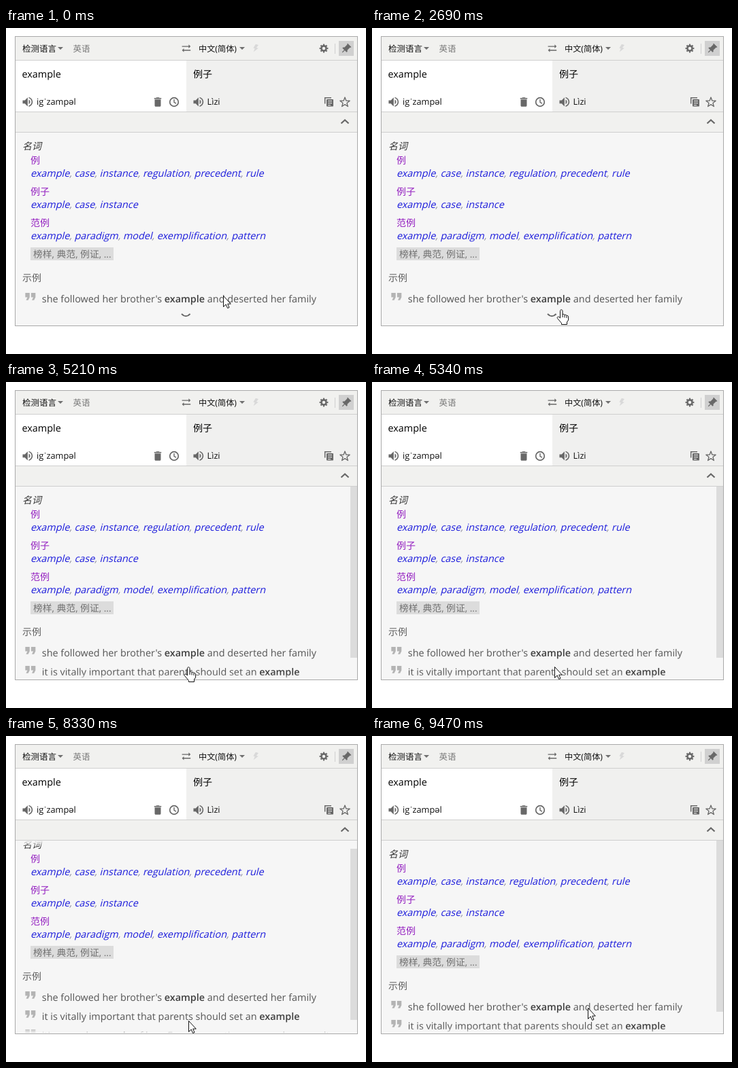
Write an HTML page that moves like this. It is 529 by 480 pixels and loops after 9.54 s.

```html
<!DOCTYPE html>
<html lang="zh-CN">
<head>
<meta charset="utf-8">
<title>Translation popup</title>
<style>
  html, body { margin: 0; width: 100%; height: 100%; overflow: hidden; background: #fff; }
  svg { display: block; }
  text { font: 14.4px "Open Sans", "Noto Sans CJK SC", "Noto Sans CJK", sans-serif; white-space: pre; text-rendering: geometricPrecision; }
  .head { font-size: 12.5px; }
  .sound { font-size: 12.8px; }
  .cjk { font-size: 14px; }
  .sense { fill: #9420c0; }
  .word { fill: #1c1cdc; }
  .comma { fill: #8c8c9c; }
  .sample { fill: #555; }
  .sample tspan { font-weight: 600; fill: #404040; }
  .icon { fill: #686868; }
  .line { fill: none; stroke: #686868; }
</style>
</head>
<body>
<svg width="529" height="480" viewBox="0 0 529 480">
  <defs>
    <clipPath id="view"><rect x="14" y="154" width="502" height="284"/></clipPath>
    <linearGradient id="fade" x2="0" y2="1">
      <stop stop-color="#f6f6f6"/>
      <stop offset="1" stop-color="#f6f6f6" stop-opacity="0"/>
    </linearGradient>
    <path id="speaker" d="M3 9v6h4l5 5V4L7 9H3zm13.5 3c0-1.77-1.02-3.29-2.5-4.03v8.05c1.48-.73 2.5-2.25 2.5-4.02zM14 3.23v2.06c2.89.86 5 3.54 5 6.71s-2.11 5.85-5 6.71v2.06c4.01-.91 7-4.49 7-8.77s-2.99-7.86-7-8.77z"/>
    <path id="quote" d="M6 17h3l2-4V7H5v6h3zm8 0h3l2-4V7h-6v6h3z" fill="#b4b4b4"/>
    <path id="caret" d="M0 0h8l-4 4z" fill="#707070"/>
  </defs>

  <!-- Panel -->
  <rect x="13" y="12" width="504" height="427" fill="#f6f6f6"/>
  <rect x="14" y="13" width="502" height="34" fill="#f1f1ef"/>
  <rect x="14" y="48" width="251" height="75" fill="#fff"/>
  <rect x="265" y="48" width="251" height="75" fill="#f0f0ef"/>
  <rect x="14" y="124" width="502" height="29" fill="#f1f1ef"/>
  <path d="M14 47.5h502M14 123.5h502M14 153.5h502" stroke="#cfcfcf"/>

  <!-- Toolbar -->
  <text class="head" x="24" y="35" fill="#111">检测语言</text>
  <use href="#caret" x="76" y="28"/>
  <text class="head" x="98.5" y="35" fill="#777">英语</text>
  <path class="icon" transform="translate(256.5 21.5) scale(.7)" d="M7 12l-4 4 4 4v-3h14v-2H7zM21 8l-4-4v3H3v2h14v3z"/>
  <text class="head" x="283" y="35" fill="#111" style="font-size:12.2px">中文(简体)</text>
  <use href="#caret" x="343" y="28"/>
  <path transform="translate(367 30) rotate(16) scale(.6) translate(-12 -12)" d="M9 2L6 13h4l-1 9 9-12h-5l3-8z" fill="#d9d9d9"/>
  <g class="line" transform="translate(467 30)">
    <circle r="3.6" stroke-width="2.6"/>
    <circle r="5.5" stroke-width="1.8" pathLength="16" stroke-dasharray="1 1" stroke-dashoffset=".5"/>
  </g>
  <path d="M483.5 23v15" stroke="#d0d0d0"/>
  <rect x="489" y="19" width="22" height="22" fill="#d0d0d0"/>
  <path class="icon" transform="translate(499.5 30.5) rotate(45) scale(.74) translate(-12 -12)" d="M16 12V4h1V2H7v2h1v8l-2 2v2h5.2v6h1.6v-6H18v-2l-2-2z"/>

  <!-- Input and result -->
  <text x="23.5" y="73" fill="#000">example</text>
  <text class="cjk" x="275" y="73.3" fill="#000">例子</text>
  <use href="#speaker" class="icon" transform="translate(22 99) scale(.82)"/>
  <text class="sound" x="45" y="113" fill="#111">igˈzampəl</text>
  <path class="icon" transform="translate(214 100) scale(.75)" d="M6 19c0 1.1.9 2 2 2h8c1.1 0 2-.9 2-2V7H6v12zM19 4h-3.5l-1-1h-5l-1 1H5v2h14V4z"/>
  <g class="line">
    <circle cx="247" cy="109" r="6.3" stroke-width="1.7"/>
    <path d="M247 105v4.3l3 1.8" stroke-width="1.4"/>
  </g>
  <use href="#speaker" class="icon" transform="translate(273 99) scale(.82)"/>
  <text class="sound" x="295.5" y="113" fill="#111">Lìzi</text>
  <path class="line" d="M468.7 111.5v-8.8h9.3" stroke-width="1.5"/>
  <rect class="icon" x="471" y="105" width="10" height="10.5" rx=".8"/>
  <path d="M473 107.5h6M473 110.5h6M473 113.5h4" stroke="#f0f0ef"/>
  <path id="star" class="line" stroke-width="1.3" stroke-linejoin="round"/>
  <path class="line" d="M492.5 140.500l5.5-5 5.5 5" stroke-width="2.2"/>

  <!-- Dictionary -->
  <g clip-path="url(#view)">
    <g id="content">
      <text class="cjk" fill="#333" transform="translate(24 179) skewX(-14)">名词</text>
      <rect x="36" y="323" width="122" height="19" fill="#dcdcdc"/>
      <text x="40" y="338" fill="#707070" style="font-size:13.8px">榜样, 典范, 例证, ...</text>
      <text class="cjk" x="24" y="373" fill="#606060">示例</text>
    </g>
    <rect x="14" y="154" width="492" height="9" fill="url(#fade)"/>
    <rect id="lowerFade" x="14" y="430" width="492" height="8" fill="url(#fade)" transform="rotate(180 260 434)"/>
    <rect id="thumb" x="506" width="10" height="252" fill="#dcdcdc"/>
    <path id="more" class="line" d="M258 421q6.3 6.6 12.6 0" stroke-width="1.9"/>
  </g>
  <rect x="13.5" y="12.5" width="503" height="426" fill="none" stroke="#a9a9a9"/>

  <g id="tooltip">
    <rect x="266.5" y="438.5" width="114" height="31" fill="#f8f8f8" stroke="#a9a9a9"/>
    <text x="277" y="458.3" fill="#111" style="font-size:12px">显示全部3个示例</text>
  </g>

  <!-- Pointers, with the hot spot at 0,0 -->
  <path id="arrow" d="M.5 .5V16.5L4.2 13L6.6 18.5L9 17.5L6.7 12.2H11.3Z" fill="#fff" stroke="#111"/>
  <g id="hand" fill="#fff" stroke="#111" stroke-linejoin="round">
    <path d="M-1.5 2.5C-1.5 .3 2 .3 2 2.5V8c.5-1 3-.8 3 .7c.8-1 3-.4 3 1c1-.8 2.6 0 2.6 1.4V16L8.5 19V22.5H.5V20.5L-5.5 13.5c-1.2-1.6 1-3.2 2.5-1.9L-1.5 13Z"/>
    <path d="M2 8v4M5 9v3.5M8 10v3" fill="none"/>
  </g>
</svg>

<script>
const LOOP = 9540;
const $ = id => document.getElementById(id);
const content = $('content');
const add = markup => content.insertAdjacentHTML('beforeend', markup);

const senses = [
  ['例', 'example case instance regulation precedent rule'],
  ['例子', 'example case instance'],
  ['范例', 'example paradigm model exemplification pattern']
];
senses.forEach(([sense, words], i) => {
  const y = 200 + 46 * i;
  const list = words.split(' ').map(w => `<tspan class="word">${w}</tspan>`).join('<tspan class="comma">, </tspan>');
  add(`<text class="cjk sense" x="36" y="${y}">${sense}</text>
    <text transform="translate(36 ${y + 19}) skewX(-14)">${list}</text>`);
});

const samples = [
  "she followed her brother's * and deserted her family",
  'it is vitally important that parents should set an *',
  "it's a good * of how European action can produce results"
];
samples.forEach((sample, i) => {
  const y = 404 + 28 * i;
  add(`<g class="${i ? 'extra' : ''}">
    <use href="#quote" transform="translate(23 ${y - 21.5}) scale(1.07)"/>
    <text class="sample" x="52.8" y="${y}">${sample.replace('*', '<tspan>example</tspan>')}</text></g>`);
});
const extras = [...document.querySelectorAll('.extra')];

const starPoints = Array.from({ length: 10 }, (_, i) => {
  const r = i % 2 ? 3.1 : 7.5, a = Math.PI * (i / 5 - 0.5);
  return `${498 + r * Math.cos(a)} ${109.5 + r * Math.sin(a)}`;
});
$('star').setAttribute('d', `M${starPoints.join('L')}Z`);

const show = (el, on) => el.setAttribute('visibility', on ? 'visible' : 'hidden');
const ease = u => u * u * (3 - 2 * u);

// Pointer moves arrive in discrete mouse samples.
function pointer(t) {
  const home = [319, 394], button = [268, 419];
  const between = (a, b, u) => a.map((v, i) => Math.round(v + (b[i] - v) * u));
  if (t < 2140) return home;
  if (t < 9130) {
    const u = Math.min(1, (t < 2190 ? 1 : 2 + Math.floor((t - 2190) / 69)) / 12);
    return between(home, button, (u + ease(u)) / 2);
  }
  const u = Math.min(1, (1 + Math.floor((t - 9130) / 68)) / 6);
  return between(button, [317, 400], ease(u));
}

function scrollAt(t) {
  if (t < 6790 || t >= 8400) return 0;
  return t < 8330 ? 36 : 14;
}

function draw(t) {
  const open = t >= 5210;
  const scroll = scrollAt(t);
  const [x, y] = pointer(t);
  const overButton = y >= 414 && t < 5340;

  content.setAttribute('transform', `translate(0 ${-scroll})`);
  extras.forEach(el => show(el, open));
  show($('more'), !open);
  show($('lowerFade'), open);
  show($('thumb'), open);
  $('thumb').setAttribute('y', Math.round(154 + scroll * 284 / 320));
  show($('tooltip'), t >= 3430 && !open);

  show($('arrow'), !overButton);
  show($('hand'), overButton);
  $('arrow').setAttribute('transform', `translate(${x} ${y})`);
  $('hand').setAttribute('transform', `translate(${x} ${y})`);
}

const start = performance.now();
function tick() {
  draw((performance.now() - start) % LOOP);
  requestAnimationFrame(tick);
}
tick();
</script>
</body>
</html>
```
